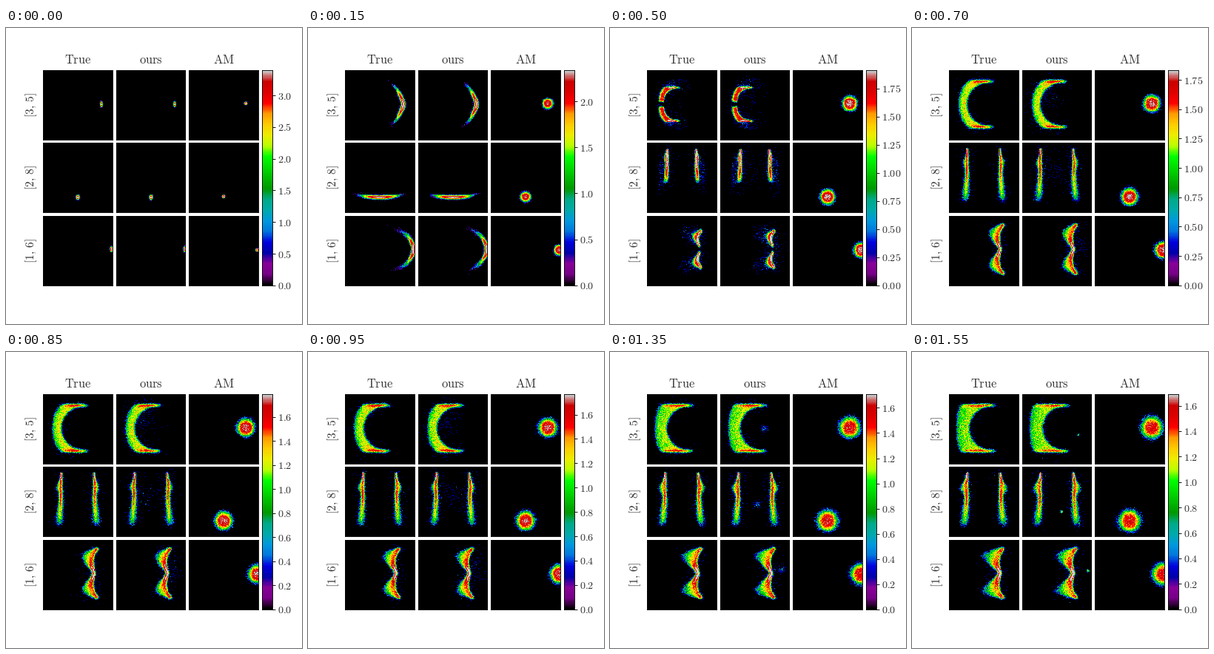
Recreate the animation shown at these times as a matplotlib script. Size 400 by 400 pixels, loop 1600 ms.

```python
import numpy as np
import matplotlib.pyplot as plt
from matplotlib.animation import FuncAnimation

plt.rcParams["mathtext.fontset"] = "cm"

SIZE, DPI = 400, 80
FRAMES, INTERVAL = 32, 50
MOVING, STILL, BINS = 20000, 14000, 100
LEFT, TOP, SIDE, PITCH = 50, 56.8, 94, 98.5
BAR_LEFT, BAR_WIDTH = 346, 14
INK = "0.2"


# Loops: paths of the early spreading, s from 0 to 1, in panel pixels, y down.
def d_loop(s):
    a = 2.88 * s
    return 50 + 29 * np.cos(a) - 8 * np.sin(a), 46 - 37 * np.sin(a)


def smile_loop(s):
    return 47 + 43 * np.sin(2.78 * s), 74 - 61 * s ** 2.2


def wedge_loop(s):
    out = np.minimum(s / 0.55, 1)
    back = np.maximum((s - 0.55) / 0.45, 0)
    return (92.5 - 79.5 * out ** 2 + 60 * back,
            45 - 37 * np.sin(np.pi / 2 * out) + 25 * back)


# Rims: sharp sides of the settled shapes, as x, y, depth behind the rim, blur.
def crescent_rim(q):
    x, y = 58 - 31 * np.cos(1.75 * q), 46 - 31 * np.sin(1.75 * q)
    return x, y, x - 11 - 8 * q ** 2, 1


def strip_rim(q):
    feather = 8 * np.exp(-((q - 0.25) / 0.12) ** 2)
    return 68.5 + 2 * q ** 2, 8 + 68 * q, 2 + feather + 6 * q ** 2, 0.6 + 1.5 * q


def wing_rim(q):
    return (70 - 5 * np.sin(np.pi * q) + 4 * q, 45 - 33 * q,
            4 + 22 * np.sin(np.pi * q ** 1.8), 1)


# Each flow is mirrored about a centre line along one axis.
FLOWS = [
    dict(label=r"$[3,\,5]$", axis=1, centre=46, loop=d_loop, end_blur=1.1,
         rim=crescent_rim, away=(-1, 0), shift=8, lean=1, fall=1.3,
         still=(77, 45), ghost=((36, 36), (76, 55))),
    dict(label=r"$[2,\,8]$", axis=0, centre=47, loop=smile_loop, end_blur=1.1,
         rim=strip_rim, away=(1, 0.5), shift=0, lean=1.4, fall=2,
         still=(47, 73), ghost=((45, 38), (53, 61))),
    dict(label=r"$[1,\,6]$", axis=1, centre=45, loop=wedge_loop, end_blur=2.8,
         rim=wing_rim, away=(-1, -0.1), shift=0, lean=1, fall=2.5,
         still=(92.5, 46), ghost=((75, 38), (89, 42))),
]


def smoothstep(x):
    x = min(max(x, 0), 1)
    return x * x * (3 - 2 * x)


def early_cloud(flow, frame, rng):
    """A small spot that is stretched along the loop and piles up at its ends."""
    u = np.abs(rng.normal(size=MOVING)) * 0.004 * np.exp(6.2 * frame / 6)
    s = u / np.sqrt(1 + u * u)
    grown = min(frame / 2, 1)
    sx = 0.45 + 0.6 * grown
    sy = 1 + (flow["end_blur"] - 1) * s * grown
    return np.array(flow["loop"](s)) + rng.normal(size=(2, MOVING)) * [sx + 0 * s, sy]


def late_cloud(flow, frame, rng):
    """The settled shape, which slowly grows wider behind its rim."""
    wide = 0.6 + 0.4 * np.clip((frame - 14) / 17, 0, 1)
    x, y, depth, blur = flow["rim"](rng.beta(1, flow["lean"], MOVING))
    d = rng.beta(1, flow["fall"], MOVING) * depth * wide + flow["shift"] * (1 - wide)
    ax, ay = flow["away"]
    return np.array([x + ax * d, y + ay * d]) + rng.normal(size=(2, MOVING)) * blur


def moving_cloud(flow, frame, rng, stray):
    settled = smoothstep((frame - 6) / 7)
    start = early_cloud(flow, frame, rng)
    p = start + (late_cloud(flow, frame, rng) - start) * settled
    axis, centre = flow["axis"], flow["centre"]
    p[axis] = centre + (p[axis] - centre) * rng.choice([-1, 1], MOVING)
    k = int(MOVING * stray * settled)
    p[:, :k] += rng.normal(size=(2, k)) * 6
    return p


def ghost_cloud(flow, frame, rng):
    """A few particles that gather while drifting towards the starting point."""
    p = np.clip((frame - 14) / 17, 0, 1) ** 2
    start, end = np.array(flow["ghost"])
    n = int(70 * smoothstep((frame - 7) / 6))
    spread = 0.8 + 10 * (1 - p) ** 2
    return (start + (end - start) * p + rng.normal(size=(n, 2)) * spread).T


def still_cloud(flow, frame, rng):
    radius = 6.2 * (frame / 6) ** 0.36 if frame else 1.2
    r = radius * rng.gamma(2 / 3.2, size=STILL) ** (1 / 3.2)
    turn = rng.uniform(0, 2 * np.pi, STILL)
    x, y = flow["still"]
    return np.array([x + r * np.cos(turn), y + r * np.sin(turn)])


def log_density(points):
    x, y = points
    counts = np.histogram2d(y, x, bins=BINS, range=[[0, SIDE]] * 2)[0]
    return np.log10(1 + counts)


fig = plt.figure(figsize=(SIZE / DPI, SIZE / DPI), dpi=DPI, facecolor="white")


def add_axes(x, y, w, h):
    ax = fig.add_axes([x / SIZE, 1 - (y + h) / SIZE, w / SIZE, h / SIZE])
    ax.set_xticks([])
    ax.set_yticks([])
    return ax


images = []
for row, flow in enumerate(FLOWS):
    for col, name in enumerate(["True", "ours", "AM"]):
        ax = add_axes(LEFT + col * PITCH, TOP + row * PITCH, SIDE, SIDE)
        images.append(ax.imshow(np.zeros((BINS, BINS)), cmap="nipy_spectral",
                                interpolation="nearest", aspect="auto"))
        if row == 0:
            ax.set_title(rf"$\mathrm{{{name}}}$", fontsize=14.8, pad=7.5, color=INK)
        if col == 0:
            ax.set_ylabel(flow["label"], fontsize=14, labelpad=5, color=INK)

bar = add_axes(BAR_LEFT, TOP, BAR_WIDTH, 2 * PITCH + SIDE)
bar.imshow(np.linspace(0, 1, 256)[:, None], cmap="nipy_spectral", aspect="auto",
           origin="lower", extent=[0, 1, 0, 1])
bar.yaxis.tick_right()
bar.tick_params(axis="y", labelsize=12.7, labelcolor=INK, pad=3)


def set_scale(peak):
    step = next(s for s in (0.2, 0.25, 0.5) if peak <= 9 * s)
    digits = 2 if step == 0.25 else 1
    ticks = np.arange(0, peak, step)
    bar.set_yticks(ticks / peak, labels=[f"${t:.{digits}f}$" for t in ticks])
    bar.set_ylim(0, 1)


def update(frame):
    rng = np.random.default_rng(100 + frame)
    peak = 1.65 + 0.62 * np.exp(-frame / 11.5) + 1.13 * np.exp(-frame / 1.8)
    set_scale(peak)
    clouds = []
    for flow in FLOWS:
        ours = moving_cloud(flow, frame, rng, 0.012)
        clouds += [moving_cloud(flow, frame, rng, 0.008),
                   np.hstack([ours, ghost_cloud(flow, frame, rng)]),
                   still_cloud(flow, frame, rng)]
    for image, cloud in zip(images, clouds):
        image.set_data(log_density(cloud))
        image.set_clim(0, peak)
    return images


anim = FuncAnimation(fig, update, frames=FRAMES, interval=INTERVAL,
                     repeat=True, repeat_delay=0, blit=False)
plt.show()
```
